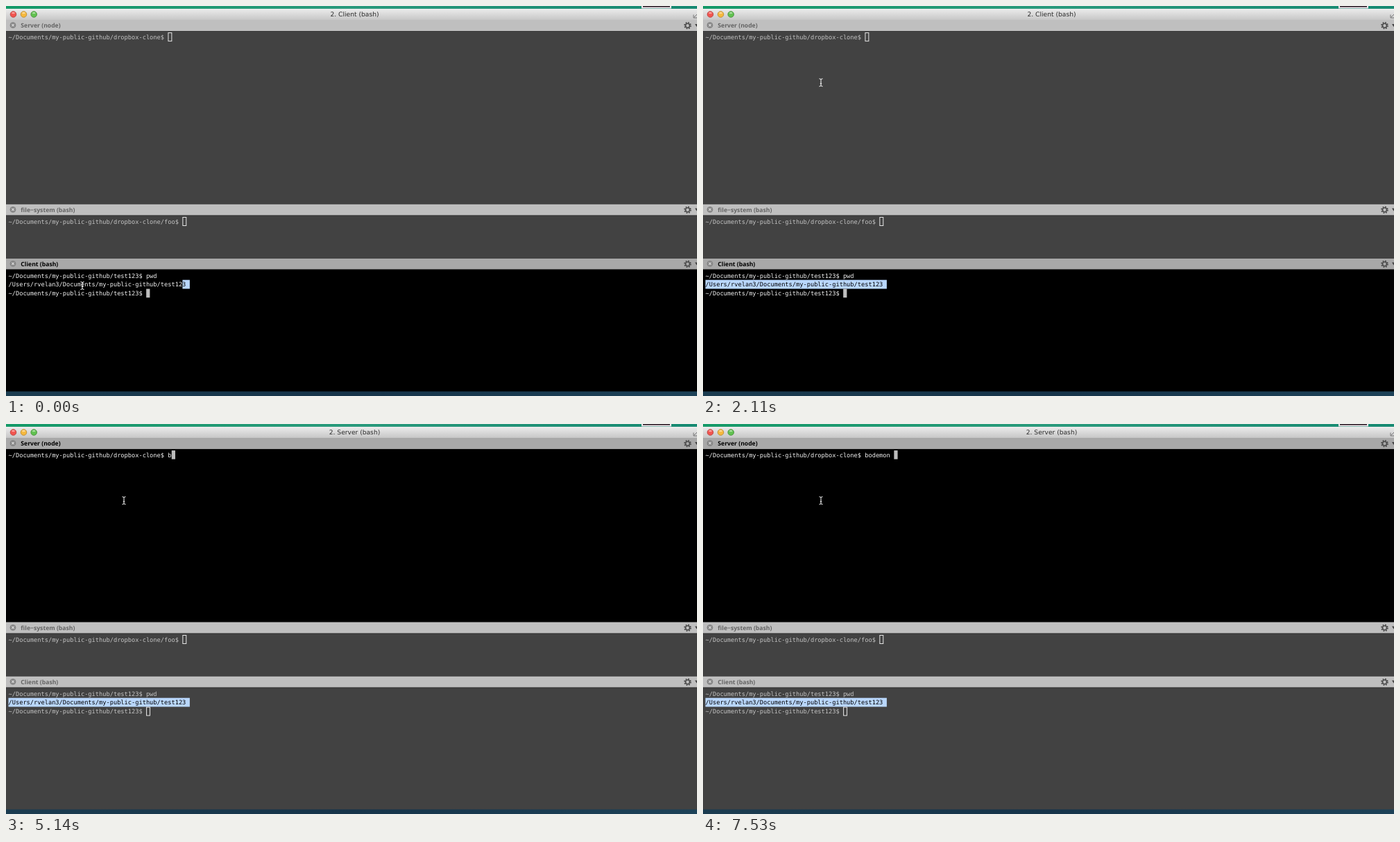
These frames come from a looping animation (996 by 562 pixels, 8000 ms). An HTML page:

```html
<!DOCTYPE html>
<html lang="en">
<head>
<meta charset="utf-8">
<title>Split terminal</title>
<style>
  html, body { margin: 0; width: 100%; height: 100%; overflow: hidden; background: #000; }
  svg { display: block; width: 996px; height: 562px; }
  text { white-space: pre; text-rendering: geometricPrecision; }
  .mono { font: 8.683px "DejaVu Sans Mono", monospace; }
  .label { font: bold 8.65px "Open Sans", sans-serif; }
  .title { font: 9.15px "DejaVu Sans", sans-serif; fill: #2c2c2c; }
</style>
</head>
<body>
<svg id="stage" viewBox="0 0 996 562">
  <defs>
    <linearGradient id="sky"><stop stop-color="#159a68"/><stop offset=".5" stop-color="#2a9a7c"/><stop offset="1" stop-color="#178a72"/></linearGradient>
    <linearGradient id="sea"><stop stop-color="#1b3c50"/><stop offset=".5" stop-color="#16344a"/><stop offset="1" stop-color="#1d4258"/></linearGradient>
    <linearGradient id="chrome" x2="0" y2="1"><stop stop-color="#ececec"/><stop offset="1" stop-color="#c6c6c6"/></linearGradient>
    <g id="close">
      <circle r="4.4" fill="#868686"/>
      <path d="M-1.7-1.7 1.7 1.7M1.7-1.7-1.7 1.7" stroke="#d8d8d8" stroke-width="1.1"/>
    </g>
    <g id="gear" fill="none" stroke="#4a4a4a">
      <circle r="4.5" stroke-width="1.7" stroke-dasharray="1.77"/>
      <circle r="3" stroke-width="1.6"/>
    </g>
    <path id="beam" d="M-2.5-5.5Q0-5.5 0-4Q0-5.5 2.5-5.5M0-4V4M-2.5 5.5Q0 5.5 0 4Q0 5.5 2.5 5.5M-1.2 1.5H1.2" fill="none" stroke="#fff"/>
  </defs>
  <rect width="996" height="5" fill="url(#sky)"/>
  <path d="M917 0V2.5H958V0" fill="#21131c" stroke="#f3e6ec" stroke-width="2"/>
  <rect y="555" width="996" height="7" fill="url(#sea)"/>
  <rect y="4" width="996" height="16.5" fill="url(#chrome)"/>
  <g id="lights"></g>
  <path d="M991 17V12.5M991 17H996M991.5 16.5 996 12" stroke="#777" fill="none"/>
  <g id="view"></g>
</svg>
<script>
const CELL = 8.683 * 0.60205, LEFT = 3.5, LOOP = 8000;
const $ = id => document.getElementById(id);
const col = n => LEFT + n * CELL;

const HOME = '~/Documents/my-public-github/';
const PWD = '/Users/rvelan3/Documents/my-public-github/test123';

// Each track lists [start time, value]; values change in hard steps.
const tracks = {
  pointer: [[0, [110, 403]], [140, [61.5, 403]], [470, [17.5, 403]], [620, [10.5, 403]],
    [770, [3.5, 403]], [1360, [6, 406]], [1810, [148.5, 136]], [1960, [163, 118]], [2110, [170, 110.3]]],
  selected: [[0, 48], [140, 12], [320, 11], [470, 9], [620, 0]],
  focus: [[0, 'Client'], [2410, 'Server']],
  title: [[0, 'Client'], [2560, 'Server']],
  typed: [[0, ''], [5140, 'b'], [5290, 'bod'], [5590, 'bode'], [5740, 'bodem'], [5890, 'bodemo'],
    [6180, 'bodemo s'], [6630, 'bodemo '], [6930, 'bodemo'], [7230, 'bodemon'], [7530, 'bodemon ']]
};
const at = (track, t) => track.filter(([start]) => start <= t).pop()[1];

const rect = (x, y, w, h, fill, extra = '') =>
  `<rect x="${x}" y="${y}" width="${w}" height="${h}" fill="${fill}" ${extra}/>`;
const text = (x, y, kind, fill, str) => `<text x="${x}" y="${y}" class="${kind}" fill="${fill}">${str}</text>`;
const icon = (id, x, y) => `<use href="#${id}" x="${x}" y="${y}"/>`;

function pane(top, bottom, label, active) {
  const mid = top + 8;
  return rect(0, top, 996, bottom - top, active ? '#000' : '#424242') +
    rect(0, top, 996, 16, active ? '#a8a8a8' : '#bfbfbf') +
    rect(0, top + 16, 996, 1, active ? '#111' : '#363636') +
    icon('close', 10, mid - .3) + icon('gear', 982.5, mid + .2) +
    `<path d="M993 ${mid - 2}h5l-2.5 4z" fill="#444"/>` +
    text(21.3, mid + 3.2, 'label', active ? '#000' : '#646464', label);
}

// A prompt line with its block cursor, solid when the pane has focus.
function prompt(y, line, active) {
  const x = col(line.length);
  return text(LEFT, y, 'mono', active ? '#f4f4f4' : '#c4c4c4', line) + (active
    ? rect(x, y - 9.5, CELL, 12.6, '#bdbdbd')
    : rect(x + .4, y - 9, CELL - .3, 12, 'none', 'stroke="#e6e6e6"'));
}

function draw(s) {
  const server = s.focus === 'Server', client = !server;
  const ink = client ? '#f4f4f4' : '#c4c4c4';
  const [px, py] = s.pointer;
  return `<text x="502.5" y="15.4" class="title" text-anchor="middle">2. ${s.title} (bash)</text>` +
    pane(20, 285, 'Server (node)', server) +
    prompt(47.6, HOME + 'dropbox-clone$ ' + s.typed, server) +
    pane(285.6, 363, 'file−system (bash)', false) +
    prompt(313.5, HOME + 'dropbox-clone/foo$ ', false) +
    pane(363.6, 555.4, 'Client (bash)', client) +
    text(LEFT, 391.5, 'mono', ink, HOME + 'test123$ pwd') +
    rect(col(s.selected), 394.7, col(PWD.length + 1) - col(s.selected), 12.8, '#b9d7fd') +
    text(LEFT, 404.4, 'mono', ink,
      PWD.slice(0, s.selected) + `<tspan fill="#000">${PWD.slice(s.selected)}</tspan>`) +
    prompt(417.1, HOME + 'test123$ ', client) +
    icon('beam', px, py);
}

$('lights').innerHTML = [['#f2554f', '#b03a36', 10.5], ['#f6b93e', '#b58428', 25.5], ['#62c251', '#3f8a34', 40.2]]
  .map(([fill, edge, x]) => `<circle cx="${x}" cy="12" r="4.3" fill="${fill}" stroke="${edge}" stroke-width=".8"/>` +
    `<ellipse cx="${x}" cy="10" rx="2.3" ry="1.3" fill="#fff" opacity=".45"/>`).join('');

let shown = '';
function tick() {
  const t = performance.now() % LOOP, state = {};
  for (const name in tracks) state[name] = at(tracks[name], t);
  const markup = draw(state);
  if (markup !== shown) $('view').innerHTML = shown = markup;
  requestAnimationFrame(tick);
}
tick();
</script>
</body>
</html>
```
